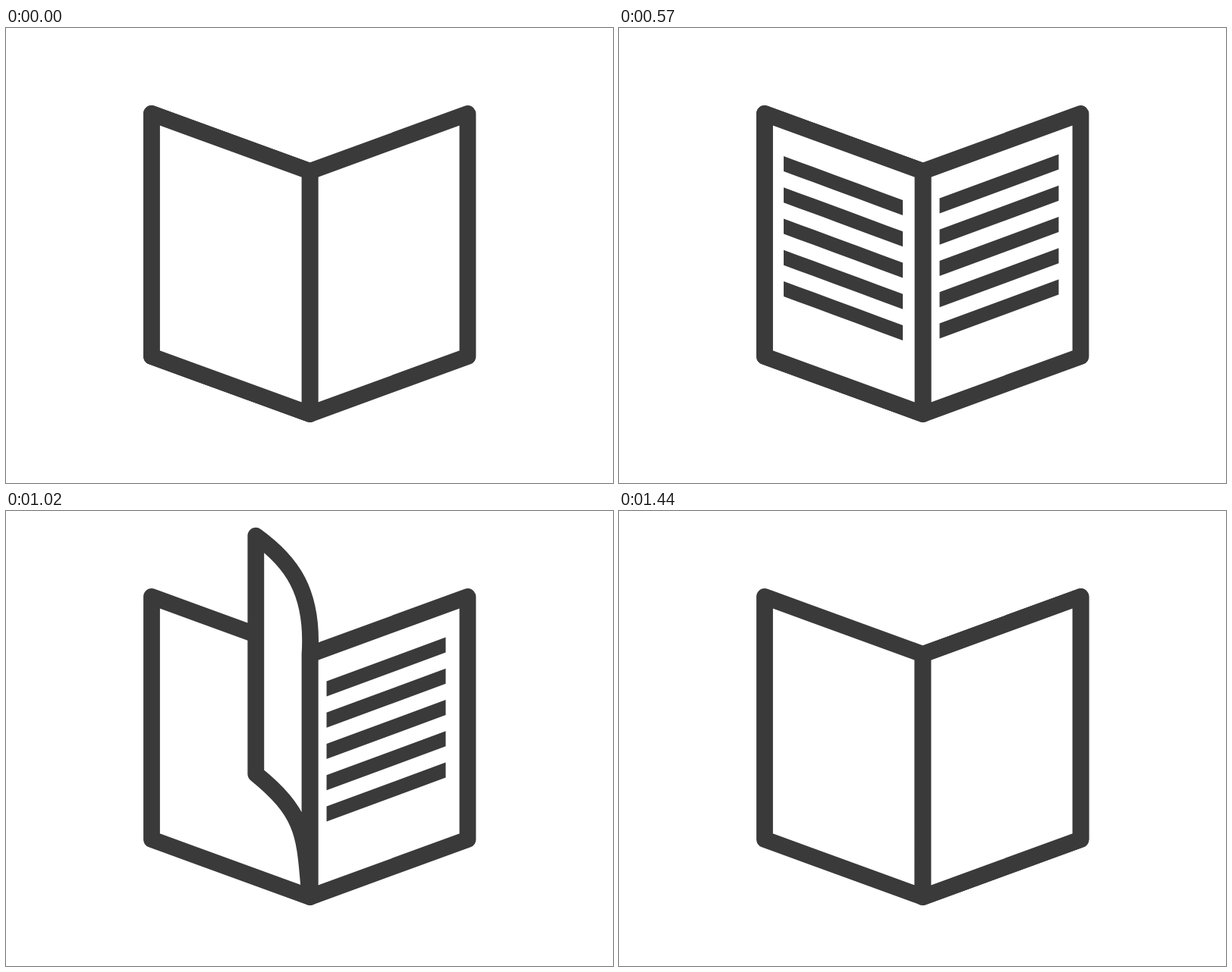
Write an HTML page without scripts that moves like this. It is 800x600 px and loops after 1770 ms.

```html
<!DOCTYPE html>
<html lang="en">
<head>
<meta charset="utf-8">
<title>Turning page</title>
<style>
  html, body { margin: 0; width: 100%; height: 100%; overflow: hidden; background: #fff; }
  svg { display: block; width: 100vw; height: 100vh; }

  .outline { fill: #fff; stroke: #3a3a3a; stroke-width: 21.8; stroke-linejoin: round; }
  .ink { fill: #3a3a3a; }
  .page { animation: turn 1770ms infinite; }
  .text { animation: fade 1770ms linear infinite; }
  .line { animation: bend 1770ms infinite; }

  /* Each text line is written 60 ms after the one above it. */
  .wipe rect {
    height: 42px;
    x: -30px;
    width: 195px;
    fill: url(#softEdge);
    animation: write 1770ms calc(var(--start) + var(--row, 0) * 60ms) infinite backwards;
  }
  .wipe rect:nth-child(2) { --row: 1; }
  .wipe rect:nth-child(3) { --row: 2; }
  .wipe rect:nth-child(4) { --row: 3; }
  .wipe rect:nth-child(5) { --row: 4; }

  @keyframes write {
    0% { transform: translateX(-165px); animation-timing-function: cubic-bezier(.4, .2, .6, .8); }
    6.78% { transform: none; animation-timing-function: step-end; }
    75%, 100% { transform: translateX(-165px); }
  }

  @keyframes fade {
    0%, 36% { opacity: 1; }
    45.76% { opacity: .53; }
    56%, 100% { opacity: 0; }
  }

  @keyframes bend {
    0%, 30.51% {
      d: path("M217 169c52 19 105 39 157 58v20c-52 -19 -105 -39 -157 -58z");
      animation-timing-function: cubic-bezier(.333, 0, .667, 0);
    }
    45.76% {
      d: path("M244 166c75 18 100 20 130 61v20c-30 -41 -55 -43 -130 -61z");
      animation-timing-function: cubic-bezier(.333, .153, .667, .5);
    }
    57.63%, 100% { d: path("M349 110c10 12 20 50 25 117v20c-5 -67 -15 -105 -25 -117z"); }
  }

  @keyframes turn {
    0%, 30.51% {
      d: path("M192 113C261.5 138.3 331 163.7 400.5 189V509C331 483.7 261.5 458.3 192 433Z");
      animation-timing-function: cubic-bezier(.333, 0, .667, 0);
    }
    45.76% {
      d: path("M212 100C285 125 347 137 400.5 189V509C345 457 270 436 212 421Z");
      animation-timing-function: cubic-bezier(.333, .153, .667, .5);
    }
    57.63% {
      d: path("M328.5 33C375 66 406 105 400.5 189V509C393 430 397 402 328.5 347Z");
      animation-timing-function: linear;
    }
    62.43% {
      d: path("M400.5 9C400.5 69 400.5 129 400.5 189V509C400.5 449 400.5 389 400.5 331Z");
      animation-timing-function: linear;
    }
    67.8% {
      d: path("M477 37C466 83 442 121 400.5 189V509C445 432 475 397 477 357Z");
      animation-timing-function: cubic-bezier(.333, .49, .667, 1);
    }
    81.36%, 100% {
      d: path("M608.5 113C539 138.3 470 163.7 400.5 189V509C470 483.7 539 458.3 608.5 433Z");
    }
  }
</style>
</head>
<body>
<svg viewBox="0 0 800 600">
  <defs>
    <linearGradient id="softEdge">
      <stop offset=".96" stop-color="#fff"/>
      <stop offset="1" stop-color="#fff" stop-opacity="0"/>
    </linearGradient>
    <mask id="leftWipe" maskUnits="userSpaceOnUse" x="0" y="0" width="800" height="600">
      <g class="wipe" style="--start: 22ms" transform="matrix(1 .369 0 1 217 169)">
        <rect y="-10"/>
        <rect y="31.25"/>
        <rect y="72.5"/>
        <rect y="113.75"/>
        <rect y="155"/>
        <!-- room for the top line as the page lifts -->
        <rect y="-210" style="height: 201px; --start: 22ms"/>
      </g>
    </mask>
    <mask id="rightWipe" maskUnits="userSpaceOnUse" x="0" y="0" width="800" height="600">
      <g class="wipe" style="--start: 158ms" transform="matrix(1 -.369 0 1 422.5 224.5)">
        <rect y="-10"/>
        <rect y="31.25"/>
        <rect y="72.5"/>
        <rect y="113.75"/>
        <rect y="155"/>
      </g>
    </mask>
  </defs>

  <path class="outline" d="M192 113L400.5 189L608.5 113V433L400.5 509L192 433ZM400.5 189V509"/>

  <g mask="url(#rightWipe)">
    <path class="ink" d="M422.5 224.5l157-58v20l-157 58zm0 41.25l157-58v20l-157 58zm0 41.25l157-58v20l-157 58zm0 41.25l157-58v20l-157 58zm0 41.25l157-58v20l-157 58z"/>
  </g>

  <path class="outline page" d="M192 113C261.5 138.3 331 163.7 400.5 189V509C331 483.7 261.5 458.3 192 433Z"/>

  <g class="text ink" mask="url(#leftWipe)">
    <path class="line"/>
    <path class="line" transform="translate(0 41.25)"/>
    <path class="line" transform="translate(0 82.5)"/>
    <path class="line" transform="translate(0 123.75)"/>
    <path class="line" transform="translate(0 165)"/>
  </g>
</svg>
</body>
</html>
```
